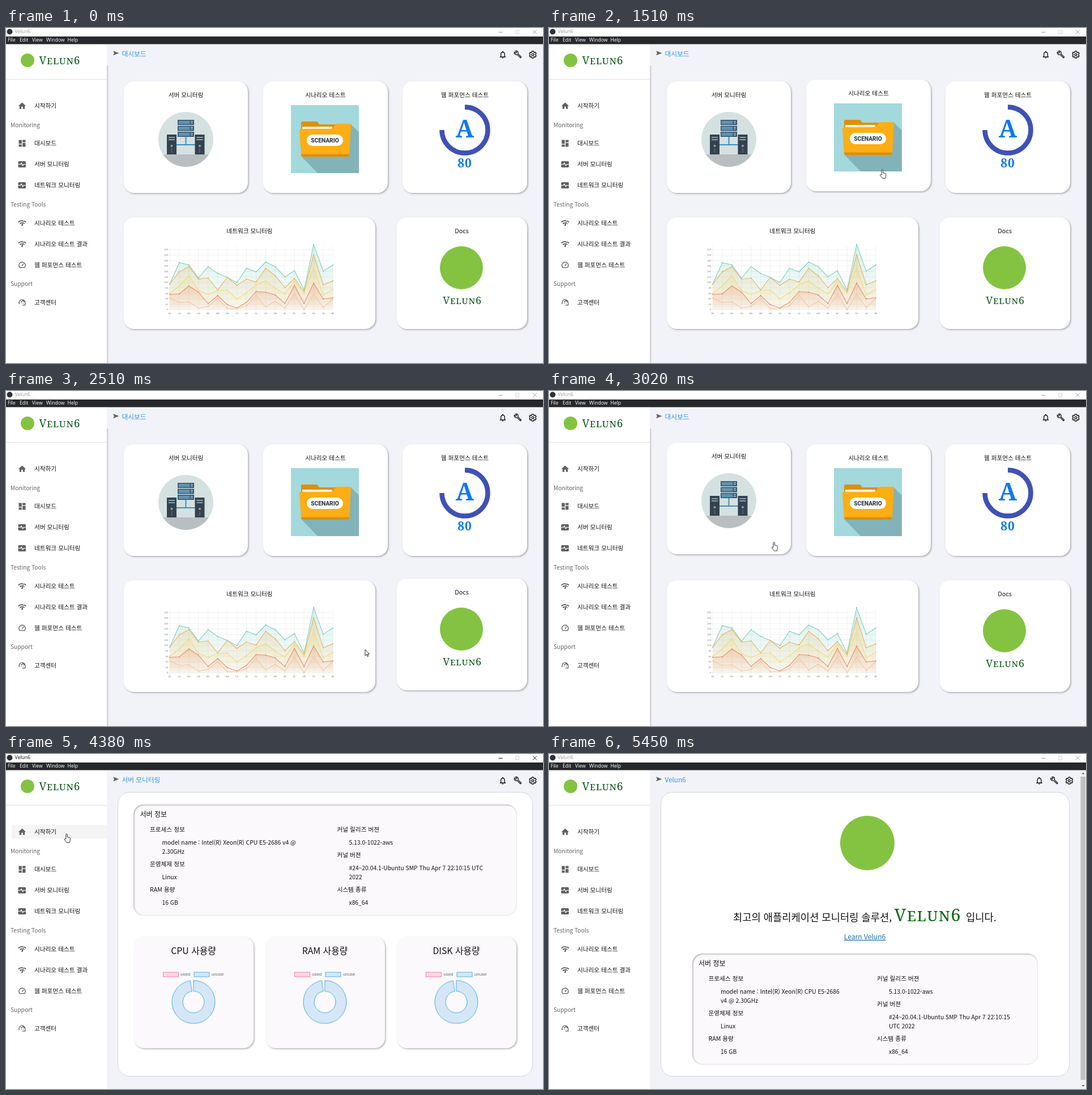
An HTML page that plays this animation: 948x591 px, repeating every 5530 ms.

```html
<!DOCTYPE html>
<html lang="ko">
<head>
<meta charset="utf-8">
<title>Velun6</title>
<style>
html, body { margin: 0; width: 100%; height: 100%; overflow: hidden; background: #f2f3f8; }
body { position: relative; font-family: "Noto Sans CJK KR", "Noto Sans CJK", "Noto Sans", sans-serif; }
.layer, .box, .page { position: absolute; }
.layer { overflow: visible; }
.page { left: 0; top: 0; width: 948px; height: 591px; visibility: hidden; }
.box { border-radius: 18px; box-sizing: border-box; }
.card { background: #fff; box-shadow: 1.5px 1.5px 3px rgba(0, 0, 0, .3); }
.tint { background: #fbf9fb; }
.info { background: #fbf9fb; box-shadow: inset 1px 1px 3px rgba(0, 0, 0, .34), inset -1px -1px 1px rgba(0, 0, 0, .03); }
.panel { background: #fff; border: 1px solid #d3d4de; border-radius: 21px; }
.mark { font-family: "Noto Serif", serif; font-variant: small-caps; font-weight: 500; letter-spacing: .04em; }
.bold { font-family: "Noto Serif", serif; font-weight: 700; }
.ui { font-family: "Open Sans", "Noto Sans", sans-serif; }
.legend { font-family: "Liberation Sans", Arial, sans-serif; }
</style>
</head>
<body>
<script>
const LOOP = 5530, GREEN = '#84c341', NAME = 'Velun6';
const rules = [];

// Add a looping CSS animation from [ms, declarations] stops.
function track(sel, stops, ease = 'step-end') {
  const id = 'k' + rules.length;
  const frames = stops.map(([ms, css]) => `${(ms / LOOP * 100).toFixed(4)}%{${css}}`).join('');
  rules.push(`@keyframes ${id}{${frames}}${sel}{animation:${id} ${LOOP}ms ${ease} infinite}`);
}

// Switch a declaration on during the given [from, to] spans.
function during(sel, on, off, ...spans) {
  const stops = spans.flatMap(([a, b]) => [[a, on], [b, off]]);
  if (spans[0][0] > 0) stops.unshift([0, off]);
  if (stops.at(-1)[0] < LOOP) stops.push([LOOP, stops[0][1]]);
  track(sel, stops);
}

const text = (x, y, s, size = 10.65, fill = '#111', attrs = '') =>
  `<text x="${x}" y="${y + size * .37}" font-size="${size}" fill="${fill}" ${attrs}>${s}</text>`;
const mid = (x, y, s, size, fill) => text(x, y, s, size, fill, 'text-anchor="middle"');
const rect = (x, y, w, h, fill, attrs = '') =>
  `<rect x="${x}" y="${y}" width="${w}" height="${h}" fill="${fill}" ${attrs}/>`;
const circle = (x, y, r, fill, attrs = '') => `<circle cx="${x}" cy="${y}" r="${r}" fill="${fill}" ${attrs}/>`;
const path = (d, fill, attrs = '') => `<path d="${d}" fill="${fill}" ${attrs}/>`;
const line = (d, color, w = 1, attrs = '') => path(d, 'none', `stroke="${color}" stroke-width="${w}" ${attrs}`);
const icon = (d, x, y, s = 16, fill = '#616161') =>
  `<path d="${d}" fill="${fill}" transform="translate(${x - s / 2} ${y - s / 2}) scale(${s / 24})"/>`;
const wordmark = (x, y, size, fill, attrs = '') =>
  `<text class="mark" x="${x}" y="${y}" font-size="${size}" fill="${fill}" ${attrs}>${NAME}</text>`;
const layer = (s, x = 0, y = 0) =>
  `<svg class="layer" width="948" height="591" style="left:${-x}px;top:${-y}px">${s}</svg>`;
// Box contents are drawn in stage coordinates.
const box = (x, y, w, h, cls, s = '', id = '') =>
  `<div class="box ${cls}" id="${id}" style="left:${x}px;top:${y}px;width:${w}px;height:${h}px">${layer(s, x, y)}</div>`;

const HOME = 'M10 20v-6h4v6h5v-8h3L12 3 2 12h3v8z';
const TILES = 'M3 13h8V3H3zM3 21h8v-6H3zM13 21h8V11h-8zM13 3v6h8V3z';
const CHECK = 'M15.9 5c-.17 0-.32.09-.41.23l-.07.15-5.18 11.65c-.16.29-.26.61-.26.96 0 1.11.9 2.01 2.01 2.01.96 0 1.77-.68 1.96-1.59L16.4 5.5c0-.28-.22-.5-.5-.5zM1 9l2 2c2.88-2.88 6.79-4.08 10.53-3.62l1.19-2.68C9.89 3.84 4.74 5.27 1 9zm20 2l2-2c-1.64-1.64-3.55-2.82-5.59-3.57l-.53 2.82c1.5.62 2.9 1.53 4.12 2.75zm-4 4l2-2c-.8-.8-1.7-1.42-2.66-1.89l-.55 2.92c.42.27.83.59 1.21.97zM5 13l2 2c1.13-1.13 2.56-1.79 4.03-2l1.28-2.88c-2.63-.08-5.3.87-7.31 2.88z';
const BELL = 'M12 22c1.1 0 2-.9 2-2h-4c0 1.1.89 2 2 2zm6-6v-5c0-3.07-1.64-5.64-4.5-6.32V4c0-.83-.67-1.5-1.5-1.5s-1.5.67-1.5 1.5v.68C7.63 5.36 6 7.92 6 11v5l-2 2v1h16v-1l-2-2zm-2 1H8v-6c0-2.48 1.51-4.5 4-4.5s4 2.02 4 4.5v6z';
const WRENCH = 'M22.61 18.99l-9.08-9.08c.93-2.34.45-5.1-1.44-7C9.79.61 6.21.4 3.66 2.26L7.5 6.11 6.08 7.52 2.25 3.69C.39 6.23.6 9.82 2.9 12.11c1.86 1.86 4.57 2.35 6.89 1.48l9.11 9.11c.39.39 1.02.39 1.41 0l2.3-2.3c.4-.38.4-1.01 0-1.41zm-3 1.6l-9.46-9.46c-.61.45-1.29.72-2 .82-1.36.2-2.79-.21-3.83-1.25C3.37 9.76 2.93 8.5 3 7.26l3.09 3.09 4.24-4.24-3.09-3.09c1.24-.07 2.49.37 3.44 1.31 1.08 1.08 1.49 2.57 1.24 3.96-.12.71-.42 1.37-.88 1.96l9.45 9.45-.88.89z';

const pulse = y => rect(21.5, y - 5.5, 13.5, 11, '#616161', 'rx="1.5"') +
  line(`M21.5 ${y}h4l1.6-2.4 2.4 4.6 1.8-2.2H35`, '#fff', 1.2);
const speed = y => line(`M24.3 ${y + 4.6}a5.7 5.7 0 1 1 8.4 0zM28.3 ${y + 1.6}l2.6-3.6`, '#616161', 1.4, 'stroke-linejoin="round"');
const headset = y => line(`M23.2 ${y + 2.5}v-2a5.3 5.3 0 0 1 10.6 0v4.4h-5M23 ${y}v3M26 ${y - 1}q3-.2 4-2.6 1 2.4 3 2.6`, '#616161', 1.3) +
  circle(27, y + 1.2, .8, '#616161') + circle(30.4, y + 1.2, .8, '#616161');

function gear(x, y) {
  const pts = [];
  for (let i = 0; i < 6; i++)
    for (const [off, r] of [[-21, 4.8], [-12, 6.3], [12, 6.3], [21, 4.8]]) {
      const a = (i * 60 + off - 90) * Math.PI / 180;
      pts.push(`${(x + r * Math.cos(a)).toFixed(2)} ${(y + r * Math.sin(a)).toFixed(2)}`);
    }
  return line(`M${pts.join('L')}Z`, '#111', 1.4, 'stroke-linejoin="round"') + circle(x, y, 1.9, 'none', 'stroke="#111" stroke-width="1.3"');
}

const header = (title, dx = 0) =>
  path('M189 40.3 199.5 44.3 189 48.3 191 44.3Z', '#616161') + text(204.5, 45.5, title, 11.7, '#2c98e8') +
  icon(BELL, 877 + dx, 47, 16, '#111') + icon(WRENCH, 903.5 + dx, 46.5, 15, '#111') + gear(930 + dx, 47);

function sidebar() {
  const rows = [[137.5, '시작하기', y => icon(HOME, 28.5, y)], [203.5, '대시보드', y => icon(TILES, 28.5, y)],
    [240.5, '서버 모니터링', pulse], [277.5, '네트워크 모니터링', pulse],
    [344, '시나리오 테스트', y => icon(CHECK, 28.5, y)], [381, '시나리오 테스트 결과', y => icon(CHECK, 28.5, y)],
    [418, '웹 퍼포먼스 테스트', speed], [484, '고객센터', headset]];
  const heads = [[171, 'Monitoring'], [311, 'Testing Tools'], [451.5, 'Support']];
  return rect(0, 28, 178, 563, '#fff') + rect(0, 90, 178, 1, '#e0e0e0') +
    circle(38, 57, 12, GREEN) + wordmark(58.5, 64, 19, '#0c5a1c') +
    '<clipPath id="row"><rect x="10" y="125" width="166" height="24"/></clipPath>' +
    rect(10, 125, 168, 24, '#f5f5f5', 'id="hover"') +
    `<g clip-path="url(#row)"><g transform="translate(106 137)">${circle(0, 0, 68, '#cdcdcd', 'id="ripple"')}</g></g>` +
    rows.map(([y, s, draw]) => draw(y) + text(50, y, s)).join('') +
    heads.map(([y, s]) => text(8, y, s, 10.2, '#666')).join('');
}

function windowBar() {
  const menu = [[3, 'File'], [24, 'Edit'], [46, 'View'], [71, 'Window'], [108.5, 'Help']];
  return rect(0, 0, 948, 15, '#fff') + circle(6.5, 6.5, 5, '#2b3038') +
    `<g id="title">${text(15.5, 6.3, NAME, 8.6, 'currentColor', 'class="ui"')}` +
    line('M869.5 7.5h7M930 3.5l7 7M937 3.5l-7 7', 'currentColor') + '</g>' +
    rect(900, 4, 5.5, 6, 'none', 'stroke="#d4d4d4"') + rect(0, 15, 948, 13.5, '#26282c') +
    menu.map(([x, s]) => text(x, 21.3, s, 8.6, '#fff', 'class="ui"')).join('');
}

function servers() {
  const tower = x => rect(x, 188, 17, 35, '#35424d') + rect(x + 3, 192, 11, 2, '#87a4b4') + rect(x + 3, 196, 11, 2, '#87a4b4') +
    circle(x + 8.5, 208, 2, '#87a4b4') + rect(x + 7.5, 212, 2, 8, '#4f6371');
  return '<clipPath id="disc"><circle cx="317.5" cy="196.5" r="48.5"/></clipPath>' +
    `<g clip-path="url(#disc)">${rect(268, 147, 100, 76, '#d5e1e0') + rect(268, 223, 100, 24, '#b9bec1')}</g>` +
    line('M317.5 192v14M301 206h33', '#3d8fc0', 2) +
    [162, 172.5, 183].map(y => rect(303, y, 29, 9, '#35536a') + rect(304.5, y + 1.5, 20, 6, '#5f93b3') +
      rect(326, y + 2, 4, 1.5, '#a8cbdc') + rect(326, y + 5, 4, 1.5, '#a8cbdc')).join('') +
    tower(284) + tower(333.5);
}

const folder = () => rect(503, 136, 120, 120, '#a3d8dc') + path('M608 169 623 184V256H550L521 226Z', '#82b3b8') +
  path('M521 167q0-2 2-2h25q2 0 3 2l2 3h50q3 0 3 3v40H521Z', '#e08e0b') + path('M523 174h53v7h-53Z', '#fff3d6') +
  path('M518 181q0-3 3-3h52q3 0 5-3l2-3q2-3 5-3h20q4 0 4 4l-3 51q0 3-4 3H525q-4 0-4-3Z', '#fdae14') +
  path('M521 222.5h85.3l-.3 1.5q0 3-4 3H525q-4 0-4-3Z', '#e08e0b') + rect(531, 188, 64, 20, '#fff', 'rx="10"') +
  text(563, 198, 'SCENARIO', 10.2, '#37424a', 'text-anchor="middle" font-weight="800" font-family="Roboto, sans-serif"');

const score = () => line('M810 139.5A40.5 40.5 0 1 1 769.5 180', '#3f51b5', 8.5) +
  '<g class="bold" text-anchor="middle" fill="#0b78f4"><text x="810" y="193" font-size="43">A</text><text x="810" y="246" font-size="21" letter-spacing="1">80</text></g>';

function chart() {
  const x = i => 289 + i * 16.94, base = 497;
  const series = [
    ['#7fd0c4', [452, 414, 418, 441, 421, 433, 440, 449, 424, 430, 413, 421, 439, 428, 462, 382, 429, 418]],
    ['#e9b55f', [452, 430, 421, 443, 441, 462, 440, 454, 443, 448, 424, 437, 458, 442, 465, 400, 453, 446]],
    ['#f3da7c', [468, 455, 437, 463, 470, 463, 462, 478, 467, 453, 446, 459, 469, 447, 468, 423, 471, 461]],
    ['#ec8d74', [470, 469, 455, 466, 486, 472, 488, 494, 484, 465, 466, 471, 486, 454, 486, 450, 478, 476]],
    ['#f2c7a5', [476, 484, 483, 494, 491, 477, 495, 495, 490, 471, 492, 482, 494, 469, 497, 469, 493, 477]]];
  const labels = 'BI LU NU CN BO ZW GN CX SX GL CA HM BI EC UM TH LB BV'.split(' ');
  let s = '';
  for (let i = 0; i < 12; i++) {
    const y = base - i * 9.64;
    s += line(`M286 ${y}H577`, '#ededed', .7) + text(286, y, i * 20, 4, '#777', 'text-anchor="end"');
  }
  labels.forEach((l, i) => s += line(`M${x(i)} 385V499`, '#ededed', .7) + mid(x(i), 504, l, 4, '#777'));
  series.forEach(([c, ys], n) => {
    const pts = ys.map((y, i) => `${x(i).toFixed(1)} ${y}`).join('L');
    s += `<linearGradient id="g${n}" x2="0" y2="1"><stop stop-color="${c}" stop-opacity=".3"/><stop offset="1" stop-color="${c}" stop-opacity=".03"/></linearGradient>` +
      path(`M289 ${base}L${pts}V${base}Z`, `url(#g${n})`) + line('M' + pts, c, 1.1) + ys.map((y, i) => circle(x(i), y, 1.1, c)).join('');
  });
  return s;
}

const dashboard = () =>
  layer(header('대시보드') + '<linearGradient id="edge"><stop stop-color="#c9cad0"/><stop offset="1" stop-color="#f2f3f8"/></linearGradient>' + rect(178, 66, 4, 525, 'url(#edge)')) +
  box(208, 93.5, 219, 197, 'card', mid(317.5, 118, '서버 모니터링') + servers(), 'server') +
  box(454, 93.5, 219.5, 197, 'card', mid(564, 118, '시나리오 테스트') + folder(), 'scenario') +
  box(700, 93.5, 220, 197, 'card', mid(810, 118, '웹 퍼포먼스 테스트') + score(), 'web') +
  box(208, 334, 444, 197, 'card', mid(430, 358.5, '네트워크 모니터링') + chart(), 'network') +
  box(690, 334, 230, 197, 'card', mid(804.5, 358.5, 'Docs', 10.8) + circle(804, 423, 38, GREEN) +
    wordmark(805.5, 487, 18, '#0c5a1c', 'text-anchor="middle"'), 'docs');

function info(x, y, w, right, cpu, kernel) {
  const label = (dx, dy, s) => text(x + dx, y + dy, s);
  const value = (dx, dy, s) => text(x + dx, y + dy, s, 10.3);
  return box(x, y, w, 196, 'info', text(x + 11.5, y + 17.5, '서버 정보', 12) +
    label(29, 44.5, '프로세스 정보') + value(50.5, 67.5, cpu[0]) + value(50.5, 83.5, cpu[1]) +
    label(29, 105.5, '운영체제 정보') + value(50.5, 128.5, 'Linux') + label(29, 150.5, 'RAM 용량') + value(50.5, 173.5, '16 GB') +
    label(right, 44.5, '커널 릴리즈 버젼') + value(right + 21, 67.5, '5.13.0-1022-aws') + label(right, 89.5, '커널 버젼') +
    value(right + 21, 112.5, kernel[0]) + value(right + 21, 128.5, kernel[1]) +
    label(right, 150.5, '시스템 종류') + value(right + 21, 173.5, 'x86_64'));
}

function usage(name, x, start) {
  const key = (dx, c, s) => rect(x + dx, 385, 27, 8, c + '33', `stroke="${c}" stroke-width=".8"`) +
    text(x + dx + 31, 388.5, s, 7.8, '#666', 'class="legend"');
  const arc = (r, w, c) => circle(0, 0, r, 'none', `class="arc" pathLength="360" stroke-dasharray="360 360" stroke="${c}" stroke-width="${w}" transform="rotate(-90)"`);
  const blue = '#46a9ea';
  return box(x - 105, 322, 211, 197, 'card tint', mid(x, 347, name + ' 사용량', 15.8) + key(-53.5, '#ff6384', 'used') + key(1, '#36a2eb', 'unuse') +
    `<g class="donut" transform="translate(${x} 437.5)" style="--a:${start}deg;--o:${360 - start}">` +
    arc(28.5, 19, '#d5e7f6') + arc(38, 1, blue) + arc(19, 1, blue) + line('M0-19V-38', blue) + line('M0-19V-38', blue, 1, 'class="end"') + '</g>');
}

const serverPage = () => layer(header('서버 모니터링')) + box(196.5, 67, 733.5, 502, 'panel') +
  info(225, 89, 677, 359.5, ['model name : Intel(R) Xeon(R) CPU E5-2686 v4 @', '2.30GHz'], ['#24~20.04.1-Ubuntu SMP Thu Apr 7 22:10:15 UTC', '2022']) +
  usage('CPU', 331, 16.5) + usage('RAM', 563, 10.5) + usage('DISK', 795, 6);

const homePage = () => layer(header(NAME, -11.5)) + box(196.5, 67, 722, 502, 'panel') +
  info(252.5, 352, 610.5, 326.5, ['model name : Intel(R) Xeon(R) CPU E5-2686', 'v4 @ 2.30GHz'], ['#24~20.04.1-Ubuntu SMP Thu Apr 7 22:10:15', 'UTC 2022']) +
  layer(`<g transform="translate(560 160)">${circle(0, 0, 60, GREEN, 'id="logo"')}</g>` +
    text(325, 288.5, '최고의 애플리케이션 모니터링 솔루션,', 17.7) + wordmark(609.5, 295, 31, '#0a6b0e') + text(736, 288.5, '입니다.', 17.7) +
    text(557.5, 322.5, 'Learn ' + NAME, 12.1, '#1c6fae', 'text-anchor="middle" text-decoration="underline"') +
    rect(937.5, 28, 10.5, 563, '#f1f1f1') + rect(938.5, 40, 8.5, 535, '#c1c1c1') +
    path('M940.5 35.5h5l-2.5-3ZM940.5 584h5l-2.5 3Z', '#606060'));

const cursor = () => '<g id="cursor" stroke="#111" stroke-width=".9" stroke-linejoin="round">' +
  path('M0 0V11L2.5 8.8 4.1 12.4 5.8 11.6 4.2 8.1H7.6Z', '#fff', 'id="arrow"') +
  path('M-1.2 9V1.3a1.2 1.2 0 0 1 2.4 0V5.6l3.9.9q1.4.4 1.3 2L5.9 12.5l-.8 2.8H.2L-3.6 10.2q-.6-1.5.7-1.7Z', '#fff', 'id="hand"') + '</g>';

document.body.innerHTML = layer(sidebar()) +
  `<div class="page" id="p1">${dashboard()}</div><div class="page" id="p2">${serverPage()}</div><div class="page" id="p3">${homePage()}</div>` +
  layer(windowBar() + cursor());

const show = 'visibility:visible', hide = 'visibility:hidden';
during('#p1', show, hide, [0, 3610]);
during('#p2', show, hide, [3610, 4700]);
during('#p3', show, hide, [4700, LOOP]);
during('#title', 'color:#111', 'color:#9a9a9a', [3410, 5450]);

const up = 'transform:translateY(-3px)', flat = 'transform:none';
during('#network', up, flat, [960, 1060], [2550, 2960]);
during('#server', up, flat, [1070, 1430], [2990, 3610]);
during('#scenario', up, flat, [1440, 1780]);
during('#web', up, flat, [1810, 2170]);
during('#docs', up, flat, [2220, 2540]);

const at = (ms, x, y) => [ms, `transform:translate(${x}px,${y}px)`];
track('#cursor', [at(0, 768, 597), at(580, 768, 597), at(690, 561, 565), at(910, 561, 565), at(980, 500, 470), at(1130, 340, 250),
  at(1380, 340, 250), at(1500, 588.5, 250), at(1730, 588.5, 250), at(1870, 820, 245), at(2100, 820, 245), at(2270, 790, 430),
  at(2470, 770, 450), at(2510, 634, 456), at(2530, 634, 456), at(2590, 590, 440), at(2840, 590, 440), at(3090, 361, 234),
  at(4260, 361, 234), at(4375, 107, 141), at(4700, 107, 141), at(4795, 223.5, 197), at(4820, 223.5, 197), at(5220, 768, 597), at(LOOP, 768, 597)], 'ease-in-out');
const hands = [[960, 2495], [2550, 3470], [4330, 4720]];
during('#hand', 'opacity:1', 'opacity:0', ...hands);
during('#arrow', 'opacity:0', 'opacity:1', ...hands);

during('#hover', 'opacity:1', 'opacity:0', [4335, 4900]);
const ripple = (ms, k, o) => [ms, `transform:scale(${k});opacity:${o}`];
track('#ripple', [ripple(0, 0, 0), ripple(4640, 0, 1), ripple(4798, 1, 1), ripple(4820, 1, 1), ripple(4930, 1.6, 1), ripple(5120, 1.7, 0), ripple(LOOP, 0, 0)], 'linear');

// Each ring waits as a sliver, then sweeps open.
const sweep = (sel, from, to) => track(sel, [[0, from], [3700, from + ';animation-timing-function:cubic-bezier(.165,.84,.44,1)'], [4160, to], [LOOP, to]], 'linear');
sweep('.arc', 'stroke-dashoffset:var(--o)', 'stroke-dashoffset:8.5');
sweep('.end', 'transform:rotate(var(--a))', 'transform:rotate(351.5deg)');
during('.donut', 'opacity:1', 'opacity:0', [3680, LOOP]);
track('#logo', [[0, 'transform:none'], [4820, 'transform:none'], [5240, 'transform:translate(2px,-3px) scale(.8)'], [LOOP, 'transform:translate(2px,-3px) scale(.8)']], 'linear');

const sheet = document.createElement('style');
sheet.textContent = rules.join('\n');
document.head.append(sheet);
</script>
</body>
</html>
```
